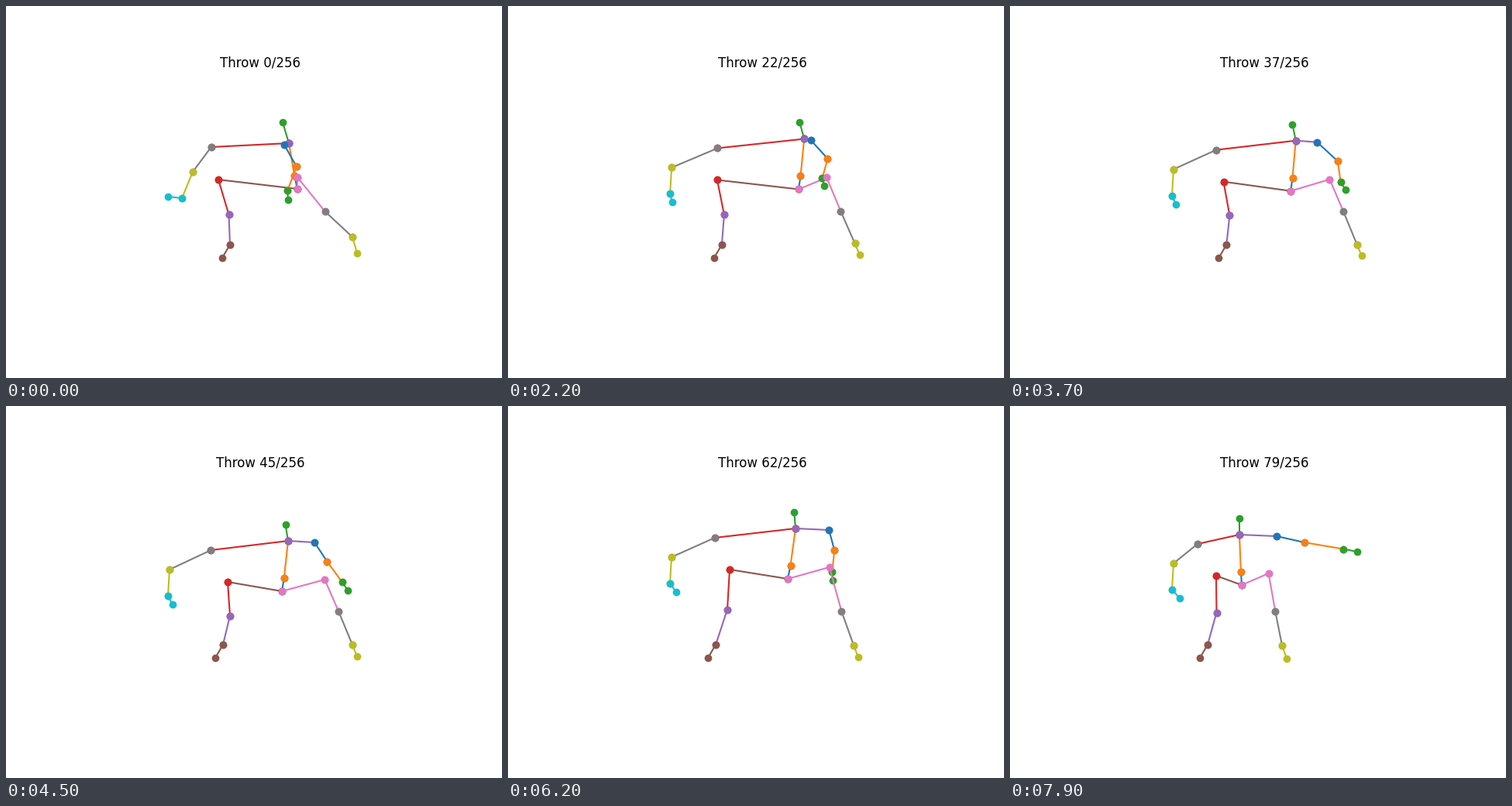
These frames come from a looping animation (640x480 px, 8 s). A matplotlib script:

```python
import numpy as np
import matplotlib.pyplot as plt
from matplotlib.animation import FuncAnimation

FRAMES, TOTAL, STEP_MS = 80, 256, 100
W, H, DPI = 640, 480, 100
t = np.arange(FRAMES)
u = t / (FRAMES - 1)


def curve(values, keys=(0, 14, 29, 45, 55, 62, 79)):
    """Monotone cubic through a few key values, sampled at every frame."""
    k, v = np.array(keys, float), np.array(values, float)
    h = np.diff(k)
    d = np.diff(v) / h
    m = np.r_[d[0], np.zeros(len(d) - 1), d[-1]]
    for i in range(1, len(d)):
        if d[i - 1] * d[i] > 0:
            m[i] = 2 * d[i - 1] * d[i] / (d[i - 1] + d[i])
    i = np.clip(np.searchsorted(k, t, side="right") - 1, 0, len(h) - 1)
    s = (t - k[i]) / h[i]
    return ((2 * s**3 - 3 * s**2 + 1) * v[i] + (s**3 - 2 * s**2 + s) * h[i] * m[i]
            + (3 * s**2 - 2 * s**3) * v[i + 1] + (s**3 - s**2) * h[i] * m[i + 1])


def mix(a, b, f):
    return a + (b - a) * f


# Drivers: opening pose fading out, torso turning to the viewer, arm swinging free
start = np.exp(-t / 4)
turn = 0.6 * (1 - np.exp(-t / 15))
swing = 1 - np.exp(-np.maximum(t - 14, 0) / 28)
lean = curve((-11, 10, 5, 8, -1, 10, -3))
bend = curve((14, 4, 23, -1, -4, 5, -6))
REACH = (0, 14, 29, 45, 55, 62, 70, 79)
reach = (curve((5, 6, 30, 43, 63, 5, 85, 104), REACH)
         + 1j * curve((71, 58, 60, 62, 48, 65, 28, 20), REACH))

# Every joint is x + iy in stage pixels
J = {}

# Trunk
J["hip"] = hip = (curve((376, 380, 368, 356, 345, 361, 299))
                  + 1j * curve((236, 235, 238, 239, 232, 223, 231)))
J["spine"] = hip + 0.35 * lean - 17j
J["neck"] = neck = hip + lean + 1j * (6 * start - 65)
J["head"] = neck - 8 * (1 - u) - 1j * (21 + 6 * start)

# Left arm hangs from a shoulder that follows a third of the sway
J["l_shoulder"] = 242 + 0.33 * (neck.real - 296) + 1j * (neck.imag + 12 - 7 * start)
J["l_elbow"] = 211 + 30 * start + 1j * (neck.imag + 37)
J["l_wrist"] = 209 + 18 * start + 1j * (neck.imag + 71)
J["l_hand"] = 209 + 10 * u + 1j * (neck.imag + 82 - 13 * start)

# Right arm throws
J["r_shoulder"] = r_shoulder = neck - 6 + 60 * swing + 2j
J["r_elbow"] = r_shoulder + 0.4 * reach + bend
J["r_wrist"] = r_shoulder + 0.83 * reach
J["r_hand"] = r_shoulder + reach

# Left leg
J["l_foot"] = l_foot = curve((279, 264, 268, 270, 254, 258, 245)) + 325j
J["l_ankle"] = l_ankle = l_foot + 10 - 17j
J["l_hip"] = l_hip = curve((274, 276, 265, 286, 277, 286, 266)) + 1j * (hip.imag - 12)
J["l_knee"] = mix(l_hip, l_ankle, 0.5) + 6 + 3j

# Right leg
J["r_foot"] = r_foot = curve((453, 453, 454, 453, 422, 452, 357)) + 1j * (319 + 7 * u)
J["r_ankle"] = r_ankle = r_foot.real - 6 + 1j * (298 + 18 * turn)
J["r_hip"] = r_hip = mix(hip.real, r_foot.real, turn) + 1j * (hip.imag - 15)
J["r_knee"] = mix(r_hip, r_ankle, 0.5).real + 265j


def chain(*names):
    return list(zip(names, names[1:]))


def limb(side, *parts):
    return chain(*(f"{side}_{p}" for p in parts))


ARM = ("shoulder", "elbow", "wrist", "hand")
LEG = ("hip", "knee", "ankle", "foot")
bones = (
    chain("hip", "spine", "neck", "head")
    + [("neck", "l_shoulder"), ("neck", "r_shoulder"), ("hip", "l_hip"), ("hip", "r_hip")]
    + limb("l", *ARM) + limb("r", *ARM) + limb("l", *LEG) + limb("r", *LEG)
)

fig = plt.figure(figsize=(W / DPI, H / DPI), dpi=DPI, facecolor="white")
ax = fig.add_axes([0, 0, 1, 1])
ax.set_xlim(0, W)
ax.set_ylim(H, 0)
ax.axis("off")

title = fig.text(0.5125, 0.83576, "", fontsize=12, family="DejaVu Sans",
                 ha="center", va="baseline")
lines = [ax.plot([], [], "o-", color=f"C{i % 10}", lw=1.5, ms=6)[0]
         for i in range(len(bones))]


def draw(n):
    title.set_text(f"Throw {n}/{TOTAL}")
    for line, (a, b) in zip(lines, bones):
        ends = np.array([J[a][n], J[b][n]])
        line.set_data(ends.real, ends.imag)
    return [title, *lines]


anim = FuncAnimation(fig, draw, frames=FRAMES, interval=STEP_MS, repeat=True, repeat_delay=0)
plt.show()
```
